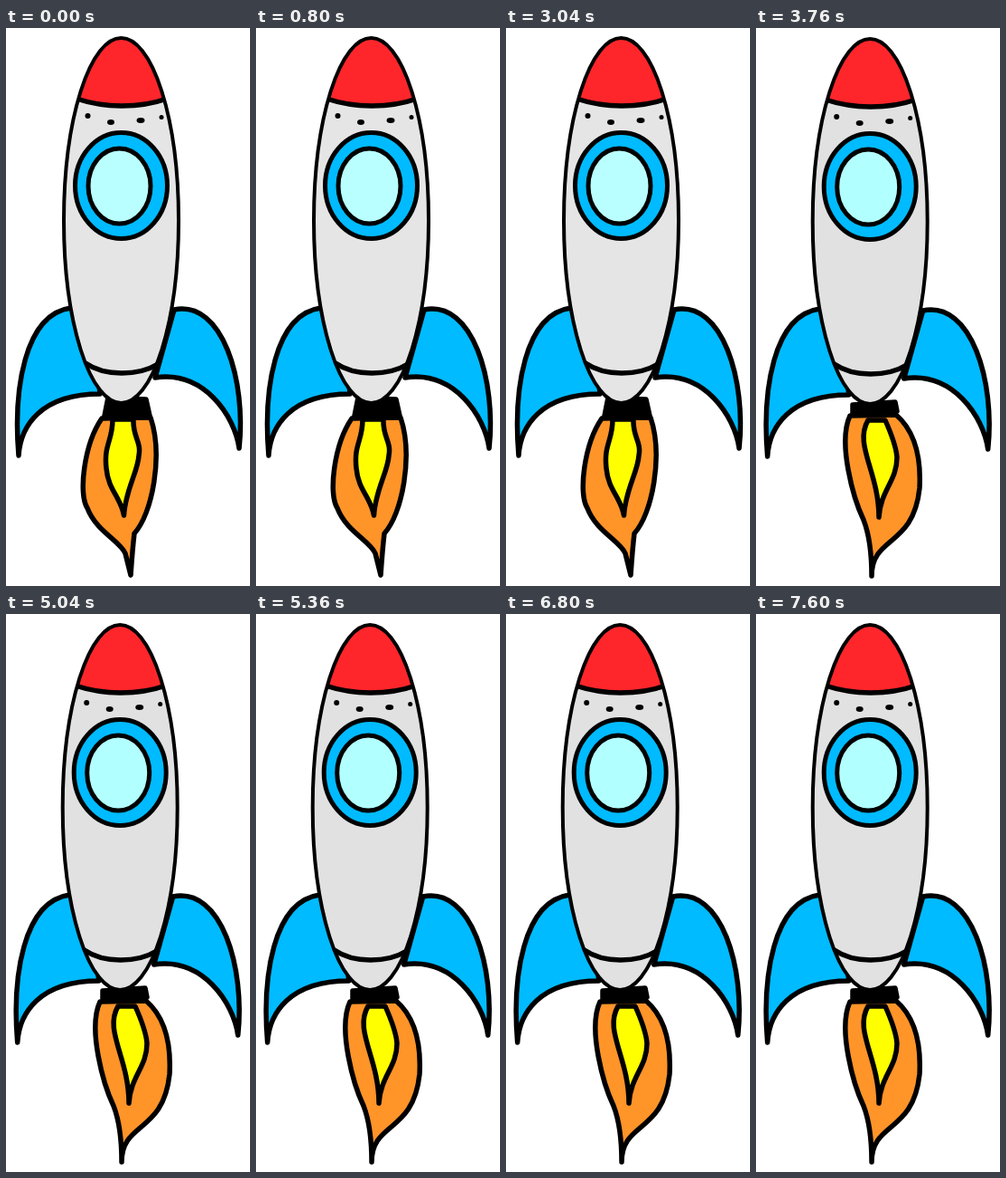
Animation, 270 px wide and 616 px high, one loop 8000 ms. Source, as an HTML page:

```html
<!DOCTYPE html>
<html lang="en">
<head>
<meta charset="utf-8">
<title>Rocket</title>
<style>
  html, body { margin: 0; width: 100%; height: 100%; overflow: hidden; background: #fff; }
  svg { display: block; width: 100%; height: 100%; overflow: hidden; }
  .strip {
    stroke: #000; stroke-width: 5.5; stroke-linecap: round; stroke-linejoin: round; fill: none;
    animation: flip 8s step-end infinite;
  }
  .first { --glass: #b9ffff; --hull: #e5e5e5; }
  .second { --glass: #b2ffff; --hull: #e1e1e1; }
  .blue { fill: #00bbff; }
  .hull { fill: var(--hull); stroke: none; }
  .outline { stroke-width: 4; }
  .ring { stroke-width: 5; }
  .nose { fill: #ff262b; }
  .glass { fill: var(--glass); }
  .fire { fill: #ff9429; }
  .core { fill: #ff0; }
  .collar, .rivets { fill: #000; }
  .rivets { stroke: none; }

  /* The two poses lie side by side; the strip jumps between them. */
  @keyframes flip {
    0%, 18%, 38%, 78% { transform: none; }
    11%, 27%, 45%, 85%, 100% { transform: translateX(-270px); }
  }
</style>
</head>
<body>
<svg viewBox="0 0 270 616">
  <defs>
    <ellipse id="body" cx="127.500" cy="212.500" rx="63.500" ry="201.500"/>
    <clipPath id="inside"><use href="#body"/></clipPath>
    <g id="rocket">
      <path class="blue" d="M72 309C20 316 8 400 14 472C16 440 38 404 104 404L100 360Z"/>
      <path class="blue" d="M186 311C240 300 266 390 258 464C253 428 219 378 165 386Z"/>
      <use href="#body" class="hull"/>
      <g clip-path="url(#inside)">
        <path class="nose" d="M78 78Q102 86 128 86Q156 86 178 78V0H78Z"/>
        <path d="M88 370Q104 381 128 381Q152 381 168 371"/>
      </g>
      <use href="#body" class="outline"/>
      <g class="rivets">
        <circle cx="90.500" cy="97" r="3"/>
        <ellipse cx="116" cy="104" rx="4" ry="3"/>
        <ellipse cx="149" cy="102" rx="4.500" ry="3"/>
        <circle cx="172" cy="98.500" r="2.500"/>
      </g>
      <g class="ring">
        <ellipse class="blue" cx="127.500" cy="174" rx="51" ry="58.500"/>
        <ellipse class="glass" cx="125.500" cy="174.500" rx="34.500" ry="41.500"/>
      </g>
    </g>
  </defs>

  <g class="strip">
    <g class="first">
      <path class="fire" d="M106 431C86 460 80 515 90 530C100 556 126 566 132 580L138 604Q140 575 142 558C162 536 174 472 160 430Z"/>
      <path class="core" d="M118 432C118 456 108 460 111 486C113 510 127 518 130.500 538C132 510 146 490 147 472C150 456 140 452 141 432Z"/>
      <path class="collar" d="M113 408L109 428H159L155 410Z"/>
      <use href="#rocket"/>
    </g>
    <g class="second" transform="translate(270)">
      <path class="fire" d="M104 428C90 458 108 520 119 543Q128 566 128 605C128 560 174 574 181 508Q184 452 155 427Z"/>
      <path class="core" d="M124 433C108 460 136 490 136 540C138 510 156 500 156 474Q155 460 143 433Z"/>
      <path class="collar" d="M107 416V425Q128 430 156 423L154 413Z"/>
      <use href="#rocket" transform="translate(-1.300 1)"/>
    </g>
  </g>
</svg>
</body>
</html>
```
